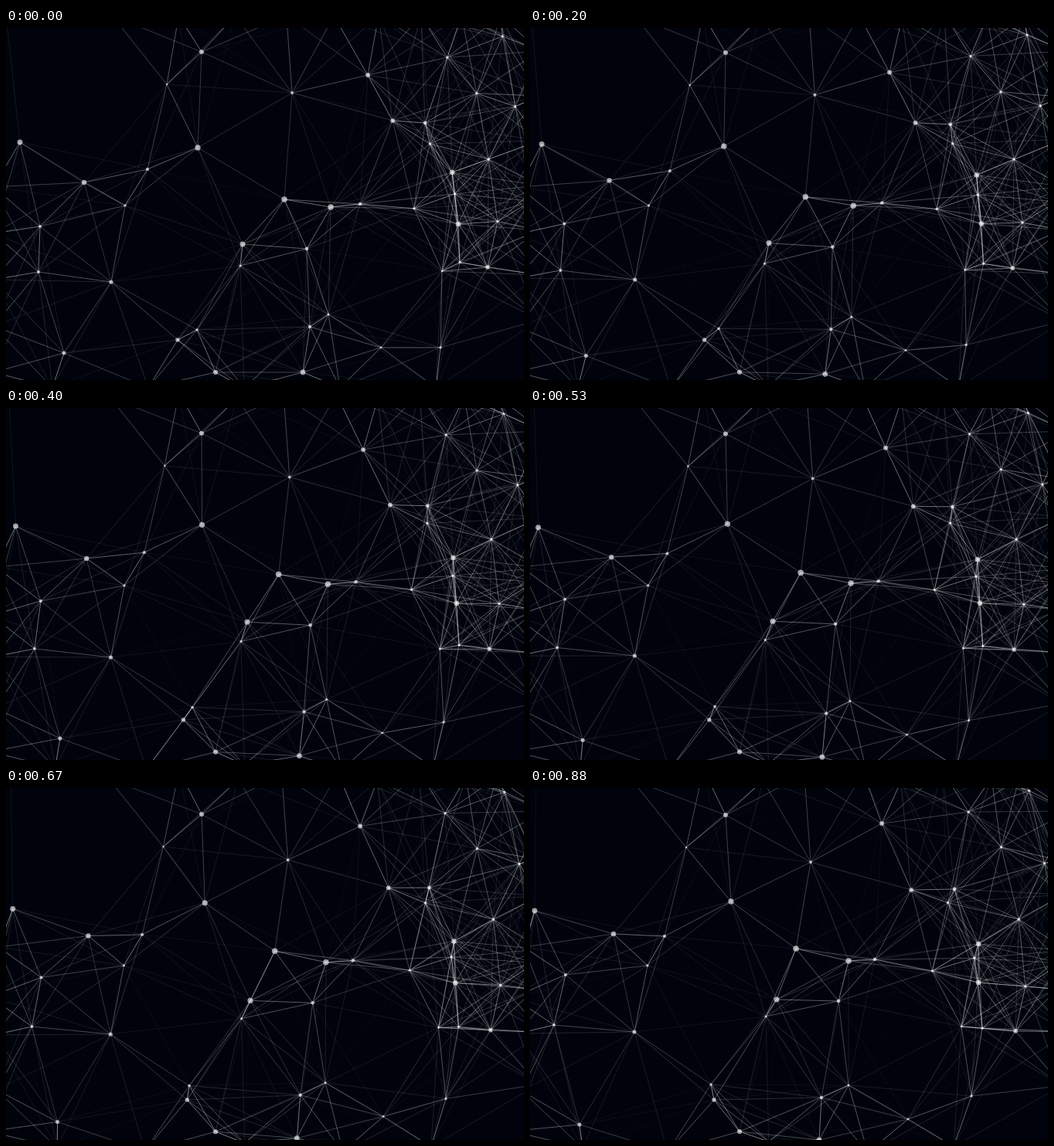
Recreate the animation shown at these times as an HTML page with a canvas. Size 670x456 px, loop 0.95 s.

```html
<!DOCTYPE html>
<html lang="en">
<head>
<meta charset="utf-8">
<title>Drifting network</title>
<style>
  html, body { margin: 0; width: 100%; height: 100%; overflow: hidden; background: #00030c; }
  canvas { display: block; }
</style>
</head>
<body>
<canvas id="stage" width="670" height="456"></canvas>
<script>
const ctx = document.getElementById('stage').getContext('2d');
const REACH = 190;
const LINE_ALPHA = 0.6;
const DOT_ALPHA = 0.62;
const LOOP = 950;
const STEPS = 14;
const GOLDEN_ANGLE = Math.PI * (3 - Math.sqrt(5));

// Key nodes from largest to smallest: x, y and the drift over one loop.
const keyNodes = [
  [360, 222, -16, -14], [420, 232, -8, -8], [248, 155, 12, -8], [306, 280, 13, -6],
  [18, 148, -12, 11], [384, 446, -10, 10], [585, 254, -5, -2], [577, 187, 3, 15],
  [101, 200, 7, -11], [271, 446, 0, -1], [253, 31, 0, 4], [468, 61, -13, -15],
  [500, 120, -7, 12], [623, 310, 5, 5], [222, 404, 16, 0], [136, 329, -1, -13],
  [75, 421, -11, 15], [542, 123, 7, 8], [389, 286, 10, -10], [458, 228, -12, -6],
  [393, 387, -16, 14], [183, 183, -9, 9], [44, 257, 2, -15], [42, 316, -11, -9],
  [370, 84, -7, 12], [247, 391, -13, -7], [562, 414, 9, -15], [154, 230, -2, 0],
  [303, 308, 2, -12], [417, 371, -5, 14], [485, 414, 4, 15], [564, 315, -6, -6],
  [208, 73, -6, 4]
];
const nodes = keyNodes.map(([x, y, dx, dy], rank) =>
  ({ x, y, dx, dy, radius: 3.8 - 2.6 * rank / keyNodes.length }));

function scatter(count, radius, place) {
  for (let i = 0; i < count; i++) {
    const [x, y] = place(i);
    const heading = i * GOLDEN_ANGLE;
    nodes.push({ x, y, dx: 8 * Math.cos(heading), dy: 8 * Math.sin(heading), radius });
  }
}

// The dense crowd on the right.
scatter(11, 1.7, i => {
  const spread = Math.sqrt((i + .5) / 11);
  const angle = i * GOLDEN_ANGLE;
  return [605 + 90 * spread * Math.cos(angle), 170 + 180 * spread * Math.sin(angle)];
});

// Neighbours just past the top, left, bottom and right edges.
scatter(10, 2, i => [640 * (i / 9) ** .7, -16]);
scatter(5, 2, i => [-16, 206 + 60 * i]);
scatter(5, 2, i => [60 + 124 * i, 466]);
scatter(7, 2, i => [690, 30 + 58 * i]);

// Alternating 70 and 60 ms steps at first, then an even 70 ms.
function stepAt(time) {
  return time < 600 ? Math.floor((time + 4) / 66.7) : 9 + Math.floor((time - 600) / 70);
}

function draw(step) {
  const progress = step / (STEPS - 1);
  const points = nodes.map(n => ({
    x: n.x + n.dx * progress, y: n.y + n.dy * progress, radius: n.radius
  }));

  ctx.globalAlpha = 1;
  ctx.fillStyle = '#00030c';
  ctx.fillRect(0, 0, 670, 456);

  ctx.strokeStyle = ctx.fillStyle = '#fff';
  points.forEach((a, i) => {
    for (const b of points.slice(i + 1)) {
      const distance = Math.hypot(a.x - b.x, a.y - b.y);
      if (distance >= REACH) continue;
      ctx.globalAlpha = LINE_ALPHA * (1 - distance / REACH);
      ctx.beginPath();
      ctx.moveTo(a.x, a.y);
      ctx.lineTo(b.x, b.y);
      ctx.stroke();
    }
  });

  ctx.globalAlpha = DOT_ALPHA;
  for (const p of points) {
    ctx.beginPath();
    ctx.arc(p.x, p.y, p.radius, 0, 2 * Math.PI);
    ctx.fill();
  }
}

const start = performance.now();
function tick() {
  draw(stepAt((performance.now() - start) % LOOP));
  requestAnimationFrame(tick);
}
tick();
</script>
</body>
</html>
```
